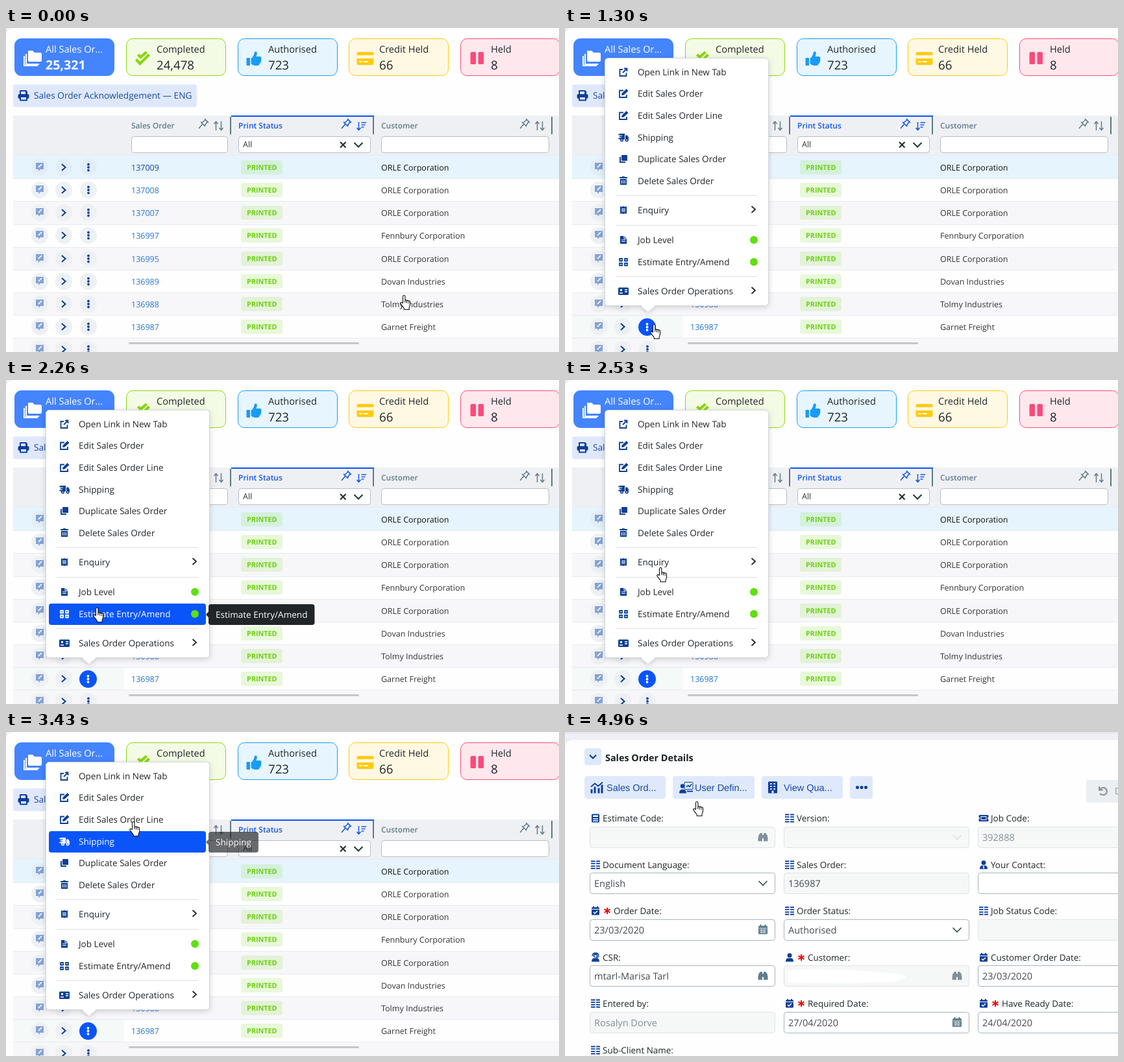
Animation of 852 by 500 pixels, one loop 6.53 s. Source, as an HTML page:

```html
<!DOCTYPE html>
<html lang="en">
<head>
<meta charset="utf-8">
<title>Sales orders</title>
<style>
html, body { margin: 0; width: 100%; height: 100%; overflow: hidden; background: #fdfefd; }
svg { display: block; width: 852px; height: 500px; font-family: "Open Sans", "Noto Sans", sans-serif; text-rendering: geometricPrecision; }
.item { --ink: #0d3f94; --text: #212529; --cut: #fff; }
.item.on { --ink: #fff; --text: #fff; --cut: #0a55f8; }
.item .bar { visibility: hidden; }
.item.on .bar { visibility: visible; }
.float { filter: drop-shadow(0 2px 4px rgba(0,0,0,.16)); }
</style>
</head>
<body>
<svg id="stage" viewBox="0 0 852 500"></svg>
<script>
const LOOP = 6530;
const NAVY = '#0d3f9a', BLUE = '#0a55f8', WHITE = '#fdfefd', GREEN = '#5fe010', SLATE = '#607d8b';

// Drawing helpers
const rect = (x, y, w, h, fill, r = 0, stroke = 'none') =>
  `<rect x="${x}" y="${y}" width="${w}" height="${h}" rx="${r}" style="fill:${fill};stroke:${stroke}"/>`;
const dot = (x, y, r, fill) => `<circle cx="${x}" cy="${y}" r="${r}" style="fill:${fill}"/>`;
const shape = (d, fill) => `<path d="${d}" style="fill:${fill}"/>`;
const line = (d, stroke, w = 1) => `<path d="${d}" style="fill:none;stroke:${stroke};stroke-width:${w}"/>`;
const text = (x, y, s, size, fill, more = '') =>
  `<text x="${x}" y="${y}" font-size="${size}" style="fill:${fill}" ${more}>${s}</text>`;
const at = (x, y, body) => `<g transform="translate(${x} ${y})">${body}</g>`;
const group = (id, body) => `<g id="${id}">${body}</g>`;
const BOLD = 'font-weight="700"', SEMI = 'font-weight="600"';
const ARIAL = 'font-family="Liberation Sans, Arial, sans-serif"';

const down = (c, w = 2) => line('M-6.5-3L0 3.5L6.5-3', c, w);
const right = (c, w = 2) => line('M-3-5L2.5 0L-3 5', c, w);

// Icons centred on 0,0: c is the ink, k the cut-out colour
const icons = {
  link: c => line('M-1-4H-5.5V6H4.5V1', c, 1.8) + line('M-1 1L5.5-5.5M1-5.5H5.5V-1', c, 1.8),
  edit: c => line('M0-4.5H-6V6H5V2', c, 1.8) + shape('M-3 3L-2.5 0L4.5-7L7.5-4L.5 2.5Z', c),
  truck: (c, k) => shape('M-6-6H2V3H-6ZM3-3.5H6L8 0V4H3Z', c) + line('M-8-4.5H-4M-8 1.5H-4', c, 1.4) +
    line('M-8-3H-2M-8 0H-3', k, 1) + dot(-2.5, 4, 2.5, c) + dot(5, 4, 2.5, c) + dot(-2.5, 4, .9, k) + dot(5, 4, .9, k),
  copy: c => rect(-3, -6, 9, 9, c, 1) + line('M-5-3V5H3', c, 2),
  trash: (c, k) => shape('M-6-6H-2V-7H2V-6H6V-4H-6ZM-5-3H5V6H-5Z', c) + line('M-2.5-1V4M0-1V4M2.5-1V4', k, 1),
  receipt: (c, k) => shape('M-5-6L-3-5L0-6L3-5L5-6V6L3 5L0 6L-3 5L-5 6Z', c) + line('M-3-2H3M-3 0H3M-3 2H3', k, 1),
  file: (c, k) => shape('M-5-6H1L5-2V6H-5Z', c) + line('M-3 0H3M-3 2.5H3M1-6V-2H5', k, 1),
  grid: (c, k) => [[-7, -6], [1, -6], [-7, 1], [1, 1]].map(([x, y]) => rect(x, y, 6, 5.5, c, 1)).join('') +
    line('M-6-3.3H-2M2-3.3H6M-6 3.7H-2M2 3.7H6', k, 1.1),
  card: (c, k) => rect(-8, -5.5, 16, 11.5, c, 1.5) + dot(-3.5, -1.5, 1.7, k) + line('M-6 3H-1M2-2H6M2 1H6', k, 1.4),
  list: c => line('M-7-5.5H-.5M1-5.5H7M-7-1.8H-.5M1-1.8H7M-7 1.8H-.5M1 1.8H7M-7 5.5H-.5M1 5.5H7', c, 1.8),
  calc: (c, k) => rect(-6, -6.5, 12, 13, c, 1.5) + rect(-4, -4.5, 8, 2.5, k) + line('M-4 1H4M-4 4H4', k, 1.6),
  ticket: (c, k) => rect(-7.5, -5, 15, 10, c, 1.5) + rect(-4, -2.5, 8, 5, 'none', 0, k) + dot(-7.5, 0, 1.5, k) + dot(7.5, 0, 1.5, k),
  check: (c, k) => rect(-6, -5.5, 12, 12, c, 1.5) + line('M-3-7V-4M3-7V-4', c, 2) + line('M-6-2.5H6', k, 1) + line('M-3 2L-1 4L3 0', k, 1.5),
  user: c => dot(0, -3.3, 3.5, c) + shape('M-6 6.5Q-6 1-2 1H2Q6 1 6 6.5Z', c),
  tie: (c, k) => icons.user(c) + shape('M-.8 1.5H.8L.9 5L0 6L-.9 5Z', k),
  agent: (c, k) => icons.user(c) + line('M-5-2Q-5-7 0-7Q5-7 5-2Q5 0 1 0', c, 1.3) + dot(0, -2.5, 1.7, k),
  calendar: (c, k) => rect(-7, -6, 14, 13, c, 1.5) + line('M-3.5-8V-4M3.5-8V-4', c, 2) +
    line('M-6-2H6M-5 1H5M-5 4H5M-2-1V6M2-1V6', k, .8),
  binoculars: c => shape('M-6.5-3L-4-6H-1V6.5H-7.5V2ZM6.5-3L4-6H1V6.5H7.5V2ZM-1-3H1V2H-1Z', c),
  down: c => down(c, 1.6)
};

// Order list page
const cards = [
  ['All Sales Or...', '25,321', '#4484fd', '#4484fd', shape('M-7-12H0L3-9H12Q14-9 14-7V3Q14 5 12 5H-5Q-7 5-7 3Z', '#fff') +
    line('M-10-7V9H10M-13-4V11H8', '#fff', 2)],
  ['Completed', '24,478', '#8cd617', '#f3fbe5', line('M-10 1.5L-4 8L10-6M-7-6L-3-2L6-10', '#8ad60c', 4.2)],
  ['Authorised', '723', '#1a9cf7', '#e7f5fe', rect(-12, -1, 5.5, 12, '#1a9cf5', 1) +
    shape('M-5 0Q0-4 0-9Q1-12 4-10Q5-7 3-3H9Q12-2 10.5 1Q12 3 10 5Q10 8 8 8Q8 11 5 11H1Q-2 11-5 8Z', '#1a9cf5')],
  ['Credit Held', '66', '#fdcb0d', '#fff9e3', rect(-13, -10, 26, 20, '#fdcb12', 2.5) + rect(-13, -5, 26, 5, '#fff9e3') +
    line('M-9 5H-5M-3 5H4', '#fff9e3', 2)],
  ['Held', '8', '#fb4b78', '#fee8ed', rect(-10, -10, 8.5, 19, '#fb4a7c', 2) + rect(2, -10, 8.5, 19, '#fb4a7c', 2)]
].map(([title, count, edge, fill, icon], i) => {
  const x = 13 + Math.round(i * 171.75), ink = i ? '#212529' : '#fff', tx = x + (i ? 47 : 48);
  return rect(x + .5, 16.5, 153, 57, fill, 10, edge) + at(x + (i ? 25.5 : 28), 47, icon) +
    text(tx, 38, title, 14.6, ink) + text(tx, 64, count, i ? 18.7 : 19.6, ink, i ? '' : BOLD);
}).join('');

const printer = shape('M-6-8H4L6-6V-2H-6Z', NAVY) + rect(-8.5, -2, 17, 7, NAVY, 2) + rect(-4, -6, 7, 4, '#dfe8fb') +
  rect(-6, 2, 12, 6.5, NAVY, 1) + rect(-4, 3, 8, 3.5, '#dfe8fb');

const pin = c => line('M1-7L7-1M2-5L-3-1M5-2L1 4M-5-2L2 5M-2 1L-8 8', c, 1.6);
const sorter = c => line('M-4 7V-6M-7-3L-4-6.5L-1-3M4-7V6M1 3L4 6.5L7 3', c, 1.5);
const sorted = c => line('M-4-6V6M-7 3L-4 6.5L-1 3M0-5H7.5M0-1.5H6M0 2H4', c, 1.5);

const column = (x, end, name, c, sort) => text(x, 155, name, 12, c, SEMI) +
  at(end - 41, 147, pin(c)) + at(end - 18.5, 151, sort(c)) + rect(end - 1, 137, 2, 27, '#5b7a80');
const filter = (x, w) => rect(x + .5, 167.5, w - 1, 25, '#fff', 4, '#b3bdc6');

const header = rect(11, 135, 841, 61, '#eff0f4') + rect(347, 135, 220, 2, BLUE) +
  column(193, 346, 'Sales Order', SLATE, sorter) + column(358, 566, 'Print Status', '#1257ee', sorted) +
  column(578, 841, 'Customer', SLATE, sorter) + filter(193, 149) + filter(358, 204) + filter(578, 259) +
  text(365, 184, 'All', 12.5, '#333') + line('M515 176L523.5 184.5M523.5 176L515 184.5', '#263238', 2.2) +
  at(543, 180, down('#263238'));

const note = c => shape('M-6-6H6V4H1L-2 7V4H-6Z', c) + line('M-2 1L3-4', '#fff', 1.7);
const dots = c => [-4.6, 0, 4.6].map(y => dot(0, y, 1.9, c)).join('');

const rowTop = i => i ? 232.2 + (i - 1) * 35.15 : 196;
const orders = [
  [137009, 'ORLE Corporation'], [137008, 'ORLE Corporation'], [137007, 'ORLE Corporation'],
  [136997, 'Fennbury Corporation'], [136995, 'ORLE Corporation'], [136989, 'Dovan Industries'],
  [136988, 'Tolmy Industries'], [136987, 'Garnet Freight'], ['', '']
];
const rows = orders.map(([code, buyer], i) => {
  const y = Math.round(rowTop(i)), mid = Math.round(215 + i * 35.15), pale = i ? '#edf0f4' : '#e2edf7';
  return rect(11, y, 841, 36, i ? (i % 2 ? WHITE : '#f7f7f9') : '#e6f4fe') + line(`M11 ${y + .5}H852`, '#e9ebef') +
    (i === 7 ? group('hover', rect(11, y + 1, 171, 35, '#f5f9f7') + line(`M11 ${y + .5}H852`, '#e1eaf4')) : '') +
    [52, 89, 127].map(x => dot(x, mid, 13, pale)).join('') +
    at(52, mid - 1, note('#86a3d3')) + at(89, mid, right(NAVY, 2.1)) + at(127, mid, dots(NAVY)) +
    (code ? text(193, mid + 5, code, 12.5, i ? '#2873d6' : '#0d47a1') + rect(362, mid - 11, 64, 22, 'rgba(112,214,20,.15)', 4) +
      text(371, mid + 4, 'PRINTED', 10.8, '#6bd010', BOLD) + text(578, mid + 5, buyer, 12.5, i ? '#333' : '#111') : '');
}).join('');

const listPage = rect(0, 0, 852, 500, '#eceef4') + shape('M0 13Q0 0 13 0H852V500H0Z', WHITE) + cards +
  rect(11, 87, 283, 35, '#dfe8fb', 4) + at(27, 104, printer) +
  text(43, 109, 'Sales Order Acknowledgement — ENG', 13.66, '#1549a3') + header + rows +
  rect(189, 485, 355, 3, '#c5c6c8', 1.5);

// Context menu
const items = [
  ['Open Link in New Tab', 'link', 68], ['Edit Sales Order', 'edit', 101], ['Edit Sales Order Line', 'edit', 135],
  ['Shipping', 'truck', 169], ['Duplicate Sales Order', 'copy', 202], ['Delete Sales Order', 'trash', 236],
  ['Enquiry', 'receipt', 281, 'more'], ['Job Level', 'file', 327, 'badge'],
  ['Estimate Entry/Amend', 'grid', 361, 'badge'], ['Sales Order Operations', 'card', 406, 'more']
];
const entry = (x, y, label, icon, end) => at(x + 28, y, icons[icon]('var(--ink)', 'var(--cut)')) +
  text(x + 50, y + 5, label, 13.54, 'var(--text)') +
  (end === 'more' ? at(x + 228.5, y - 1, right('var(--text)', 1.8)) : end === 'badge' ? dot(x + 229, y, 6, GREEN) : '');

const menu = group('menu', `<g class="float">${shape('M116 428H140L128 438Z', '#fff')}${rect(61.5, 46.5, 252, 382, '#fff', 5, '#d3d8de')}</g>` +
  shape('M117 427H139L128 437Z', '#fff') +
  [258.5, 304.5, 383.5].map(y => line(`M78 ${y}H296`, '#dbdfe4')).join('') +
  items.map(([label, icon, y, end]) =>
    `<g class="item"><g class="bar">${rect(66, y - 16, 242, 33, BLUE, 4)}</g>${entry(62, y, label, icon, end)}</g>`).join(''));

const submenu = group('submenu', `<g class="float">${rect(302.5, 367.5, 253, 78, '#fff', 5, '#d3d8de')}</g><g class="item">` +
  entry(304, 390, 'View Sales Order Job', 'card', 'badge') + entry(304, 423, 'Maintain Sales Order Tasks', 'card', 'badge') + '</g>');

const tip = group('tip', shape('M308 0L312.5-5V5Z', '#212529') + rect(312, -16, 100, 32, '#212529', 4) + text(323, 5, '', 13.54, '#fff'));

// Order details page
const fields = [
  [0, 0, 'Estimate Code', 'calc', '', 'off', 'binoculars'], [1, 0, 'Version', 'list', '', 'off', 'down'],
  [2, 0, 'Job Code', 'ticket', '392888', 'off'],
  [0, 1, 'Document Language', 'list', 'English', '', 'down'], [1, 1, 'Sales Order', 'list', '136987', 'off dark'],
  [2, 1, 'Your Contact', 'tie', '', ''],
  [0, 2, 'Order Date', 'check', '23/03/2020', 'star', 'calendar'], [1, 2, 'Order Status', 'list', 'Authorised', '', 'down'],
  [2, 2, 'Job Status Code', 'list', '', 'off'],
  [0, 3, 'CSR', 'agent', 'mtarl-Marisa Tarl', '', 'binoculars'], [1, 3, 'Customer', 'user', '', 'off star', 'binoculars'],
  [2, 3, 'Customer Order Date', 'check', '23/03/2020', ''],
  [0, 4, 'Entered by', 'list', 'Rosalyn Dorve', 'off'], [1, 4, 'Required Date', 'check', '27/04/2020', 'star', 'calendar'],
  [2, 4, 'Have Ready Date', 'check', '24/04/2020', 'star'], [0, 5, 'Sub-Client Name', 'list', '', '']
];
const star = line('M0-5V5M-4.5-2.6L4.5 2.6M4.5-2.6L-4.5 2.6', '#f00d0d', 2);
const boxes = [], values = [];
for (const [col, row, label, icon, value, flags, tail] of fields) {
  const x = 38 + col * 299, off = flags.includes('off'), must = flags.includes('star');
  const y = Math.round(133 + row * 71.5), top = Math.floor(146 + row * 71.5);
  const ink = !off || flags.includes('dark') ? '#444b52' : '#858e96';
  const tailInk = tail === 'down' ? (off ? '#dbe0e4' : '#37474f') : off ? '#82909a' : SLATE;
  boxes.push(at(x + 9, y, icons[icon](NAVY, '#fff')) + (must ? at(x + 27, y, star) : '') +
    text(x + (must ? 37 : 20), y + 5, label + ':', 13.48, '#212529') +
    rect(x + .5, top + .5, 285, 32, off ? '#f5f8f6' : '#fff', 4, off ? '#dfe3e9' : '#a8b3bd') +
    (tail ? at(x + 267, top + 16, icons[tail](tailInk, '#fff')) : ''));
  values.push(text(x + 7, top + 22, value, 14.5, ink));
}
const smear = shape('M342 369L372 366L430 367L505 372L526 376L524 381L508 385L440 388L344 387Z', '#fff');

const buttonIcons = [
  line('M-8 9V3M-3 9V-1M3 9V1M8 9V-4', NAVY, 3) + line('M-9-1L-3-6L2-2L9-8', NAVY, 1.8),
  rect(-3, -8, 13, 11, 'none', 1, NAVY) + line('M0-1L3-3L5-1L8-5', NAVY, 1.6) + dot(-6, -2, 3.2, NAVY) +
    shape('M-11 9Q-11 3-6 3Q0 3 0 9ZM1 5H10V7H1Z', NAVY),
  rect(-7, -9, 14, 18, NAVY, 1) + line('M-4-5.5H4M-4-1.5H4M-4 2.5H4', '#dfe9fb', 2.2) + line('M0-9V5', NAVY, 2.4) +
    rect(-1.5, 5, 3, 4, '#dfe9fb')
];
const buttons = [[30, 125, 'Sales Ord...', 49, 64], [166, 126, 'User Defin...', 187, 200], [303, 125, 'View Qua...', 320, 337]]
  .map(([x, w, label, ix, tx], i) => rect(x, 68, w, 35, '#dfe9fb', 4) + at(ix, 85.5, buttonIcons[i]) +
    text(tx, 91, label, 14.5, '#1347a8', ARIAL)).join('');

const detailPage = group('details', rect(0, 0, 852, 500, '#eff0f5') + rect(0, 0, 852, 3, '#e6e8ee') +
  shape('M0 27Q0 12 15 12H852V500H0Z', WHITE) + rect(30, 25, 26, 26, '#dde8fb', 4) +
  at(43, 38, line('M-5-2.5L0 2.5L5-2.5', NAVY, 2.2)) + text(62, 45, 'Sales Order Details', 14.36, '#1c2024', BOLD) +
  buttons + rect(439, 68, 35, 35, '#dfe9fb', 4) + [450.5, 457, 463.5].map(x => dot(x, 85.5, 2.5, NAVY)).join('') +
  rect(803, 74, 60, 35, '#eceff1', 4) + at(829, 91, line('M-5-2Q-2-6 2-5Q6-3 6 1Q5 6 0 6Q-3 6-5 4M-6-7V-1.5H0', '#868f97', 2)) +
  text(847, 96, 'D', 14.5, '#9aa2a9', ARIAL) +
  boxes.join('') + group('values', values.join('') + smear));

const hand = group('cursor', `<path d="M4.5 12.5V2.2a1.7 1.7 0 0 1 3.4 0V9c0-1.6 2.6-1.6 2.6.3c.2-1.4 2.5-1.3 2.6.5c.3-1.2 2.4-1 2.4.8V15.5c0 2-1.4 3-1.4 4.5V22.5H6.3V20.5C4.5 18.5 3 16 1 13.6C0 12 1.8 10.8 3 11.8Z" fill="#fff" stroke="#111" stroke-width="1.1" stroke-linejoin="round"/>` +
  line('M7.9 9V12M10.5 9.5V12.5M13.1 10.5V13', '#111', 1));

const stage = document.getElementById('stage');
stage.innerHTML = listPage + group('active', dot(126.5, 461.5, 13.5, BLUE) + at(126.5, 461.5, dots('#fff'))) +
  menu + submenu + tip + detailPage + hand;

const parts = Object.fromEntries(['hover', 'active', 'menu', 'submenu', 'tip', 'details', 'values', 'cursor']
  .map(id => [id, document.getElementById(id)]));
const entries = [...parts.menu.querySelectorAll('.item')];
const tipText = parts.tip.querySelector('text'), tipBox = parts.tip.querySelector('rect');

// Cursor path: time, x, y, eased
const path = [
  [30, 607, 412], [660, 131, 457, true], [1660, 131, 457], [1960, 126, 380], [2300, 135, 347], [2530, 141, 289],
  [2960, 172, 205], [3430, 190, 138], [3630, 196, 129], [4000, 197, 107, true]
];
// Highlighted entry from each time on
const hovers = [
  [0, -1], [1860, 9], [2080, 8], [2400, 7], [2490, -1], [2560, 6], [2800, 5],
  [3020, 4], [3330, 3], [3470, 2], [3720, 1]
];
const clamp = v => Math.max(0, Math.min(1, v));

function cursorAt(t) {
  const i = path.findIndex(p => p[0] > t);
  if (i < 1) return path[i ? path.length - 1 : 0].slice(1, 3);
  const [t0, x0, y0] = path[i - 1], [t1, x1, y1, eased] = path[i];
  let k = (t - t0) / (t1 - t0);
  if (eased) k = k * k * (3 - 2 * k);
  return [x0 + (x1 - x0) * k, y0 + (y1 - y0) * k];
}

function show(part, opacity) {
  part.style.display = opacity > 0 ? '' : 'none';
  part.style.opacity = opacity;
}

function draw(t) {
  const [x, y] = cursorAt(t).map(Math.round);
  parts.cursor.setAttribute('transform', `translate(${x} ${y})`);
  const [since, index] = hovers.filter(h => h[0] <= t).pop();
  show(parts.hover, t >= 600 ? 1 : 0);
  show(parts.active, clamp((t - 1000) / 150));
  show(parts.menu, clamp((t - 1000) / 270));
  show(parts.submenu, index === 9 ? clamp((t - since) / 80) : 0);
  entries.forEach((e, i) => e.classList.toggle('on', i === index));
  const hasTip = index >= 0 && items[index][3] !== 'more';
  show(parts.tip, hasTip ? clamp((t - since) / 150) : 0);
  if (hasTip) {
    tipText.textContent = items[index][0];
    tipBox.setAttribute('width', tipText.getComputedTextLength() + 22);
    parts.tip.setAttribute('transform', `translate(0 ${items[index][2] + 1})`);
  }
  show(parts.details, t >= 4500 ? 1 : 0);
  show(parts.values, t >= 4960 ? 1 : 0);
}

const start = performance.now();
function tick() {
  draw((performance.now() - start) % LOOP);
  requestAnimationFrame(tick);
}
tick();
</script>
</body>
</html>
```
